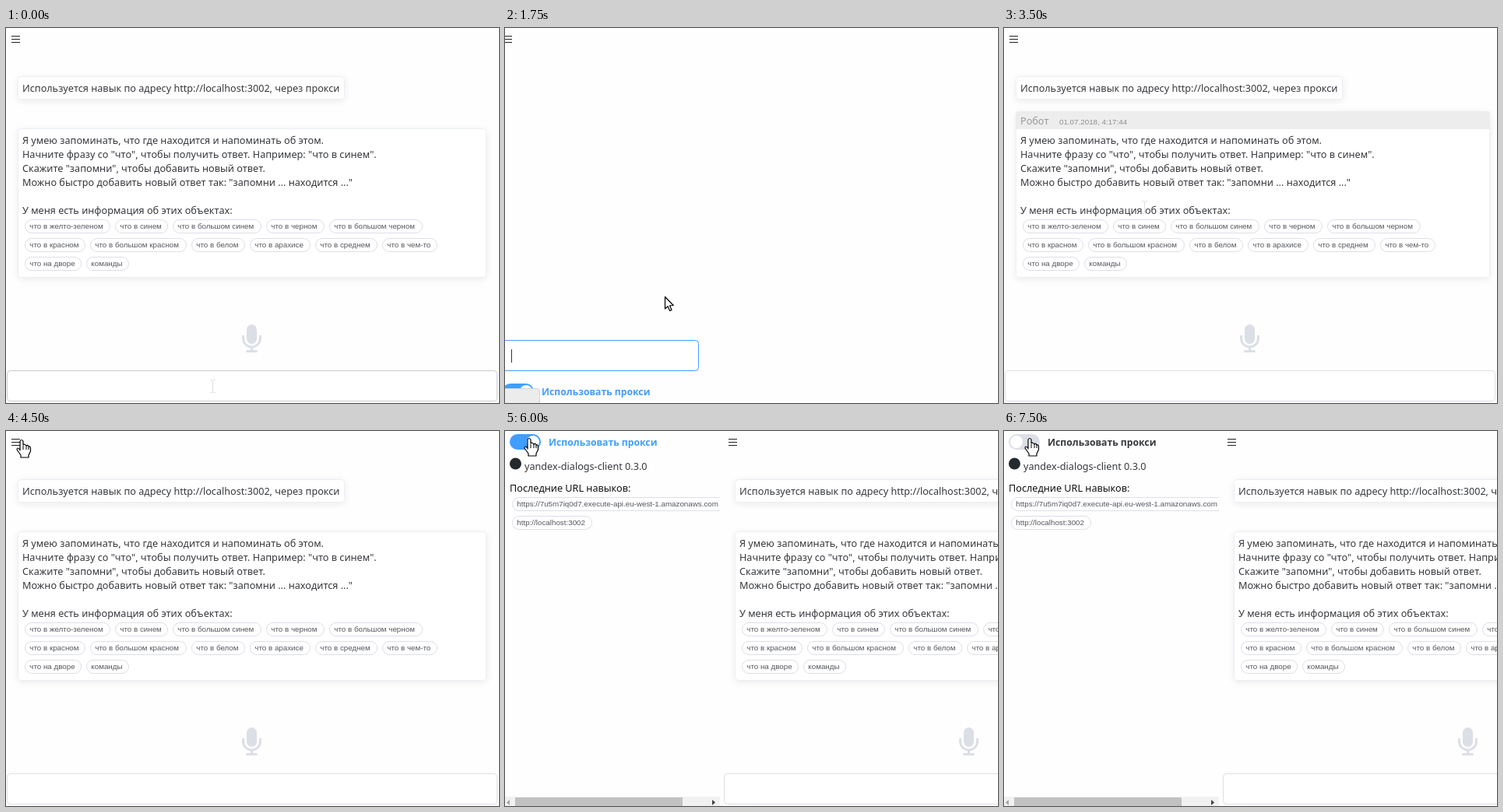
Animation, 633 px wide and 482 px high, one loop 8 s. Source, as an HTML page with a canvas:

```html
<!DOCTYPE html>
<html lang="ru">
<head>
<meta charset="utf-8">
<title>Навык: что где находится</title>
<style>
html, body { margin: 0; width: 633px; height: 482px; overflow: hidden; background: #fff; }
canvas { display: block; }
</style>
</head>
<body>
<canvas id="stage" width="633" height="482"></canvas>
<script>
const ctx = document.getElementById('stage').getContext('2d');
const W = 633, H = 482, LOOP = 8000;
const BODY = '12.65px "Noto Sans", "Open Sans", sans-serif';
const BOLD = '600 12.2px "Noto Sans", "Open Sans", sans-serif';
const SMALL = '9.8px "Liberation Sans", Arial, sans-serif';
const INK = '#36383c', BLUE = '#409eff', PALE = '#dcdfe6';

const INTRO = [
  'Я умею запоминать, что где находится и напоминать об этом.',
  'Начните фразу со "что", чтобы получить ответ. Например: "что в синем".',
  'Скажите "запомни", чтобы добавить новый ответ.',
  'Можно быстро добавить новый ответ так: "запомни ... находится ..."',
  '',
  'У меня есть информация об этих объектах:'
];
// rows of [left, width, label]
const CHIPS = [
  [[24, 110, 'что в желто-зеленом'], [140, 68, 'что в синем'], [214, 114, 'что в большом синем'],
   [334, 75, 'что в черном'], [415, 120, 'что в большом черном']],
  [[24, 78, 'что в красном'], [108, 124, 'что в большом красном'], [238, 69, 'что в белом'],
   [313, 78, 'что в арахисе'], [397, 80, 'что в среднем'], [483, 71, 'что в чем-то']],
  [[24, 73, 'что на дворе'], [103, 55, 'команды']]
];

// each scene holds until the next one starts
const SCENES = [
  { at: 0, cursor: [beam, 265, 460], focus: true },
  { at: 250, cursor: [arrow, 216, 367] },
  { at: 500, cursor: [arrow, 205, 345] },
  { at: 1750, view: loading, cursor: [arrow, 205, 345], status: true },
  { at: 2000, view: drawerOnly, cursor: [arrow, 205, 345], status: true },
  { at: 2250, cursor: [arrow, 205, 345], status: true },
  { at: 2500, cursor: [arrow, 205, 345] },
  { at: 3500, cursor: [beam, 180, 230], hover: 2 },
  { at: 3750, cursor: [beam, 85, 76], hover: 1 },
  { at: 4000, cursor: [arrow, 34, 23] },
  { at: 4250, cursor: [arrow, 24, 24] },
  { at: 4500, cursor: [hand, 20, 11] },
  { at: 4750, cursor: [hand, 20, 11], shift: 147 },
  { at: 5000, cursor: [hand, 20, 11], shift: 280 },
  { at: 6000, cursor: [hand, 31, 9], shift: 280 },
  { at: 6500, cursor: [arrow, 30, 36], shift: 280 },
  { at: 6750, cursor: [arrow, 34, 42], shift: 280 },
  { at: 7000, cursor: [hand, 33, 9], shift: 280 },
  { at: 7250, cursor: [hand, 33, 9], shift: 280, off: true }
];

function text(str, x, y, font = BODY, color = INK) {
  ctx.font = font;
  ctx.fillStyle = color;
  ctx.fillText(str, x, y);
}

function rect(x, y, w, h, color) {
  ctx.fillStyle = color;
  ctx.fillRect(x, y, w, h);
}

function round(x, y, w, h, r, fill, stroke) {
  ctx.beginPath();
  ctx.roundRect(x, y, w, h, r);
  if (fill) { ctx.fillStyle = fill; ctx.fill(); }
  if (stroke) { ctx.strokeStyle = stroke; ctx.lineWidth = 1; ctx.stroke(); }
}

function disc(x, y, r, color) {
  ctx.beginPath();
  ctx.arc(x, y, r, 0, Math.PI * 2);
  ctx.fillStyle = color;
  ctx.fill();
}

function poly(points, fill) {
  ctx.beginPath();
  points.forEach(p => ctx.lineTo(p[0], p[1]));
  ctx.closePath();
  ctx.fillStyle = fill;
  ctx.fill();
}

function card(x, y, w, h) {
  ctx.save();
  ctx.shadowColor = 'rgba(0,0,0,.08)';
  ctx.shadowBlur = 10;
  ctx.shadowOffsetY = 2;
  round(x, y, w, h, 4, '#fff');
  ctx.restore();
  round(x + .5, y + .5, w - 1, h - 1, 4, null, '#ebeef5');
}

function chip(x, y, w, label) {
  round(x + .5, y - 8.5, w - 1, 17, 8.5, '#fff', PALE);
  text(label, x + 6.3, y + 3, SMALL, '#55575c');
}

function header(x, y, w) {
  round(x, y, w, 23, [4, 4, 0, 0], '#ededed');
  text('Робот', 21, y + 17, BODY, '#999');
  text('01.07.2018, 4:17:44', 71, y + 17, SMALL, '#8c8e93');
}

function menu(x) {
  for (const y of [10, 14, 18]) rect(x, y, 11, 1, '#222');
}

function mic() {
  round(309, 381, 13, 25, 6.5, PALE);
  ctx.strokeStyle = PALE;
  ctx.lineWidth = 3;
  ctx.beginPath();
  ctx.moveTo(304.5, 395);
  ctx.lineTo(304.5, 399);
  ctx.arc(315.5, 399, 11, Math.PI, 0, true);
  ctx.lineTo(326.5, 395);
  ctx.stroke();
  rect(314, 410, 3, 5, PALE);
  round(308, 414, 15, 3, 1.5, PALE);
}

function chat(s) {
  menu(7);
  const first = s.hover === 1, second = s.hover === 2;
  card(15, first ? 40 : 62, first ? 427 : 420, first ? 52 : 30);
  if (first) header(15, 40, 427);
  text('Используется навык по адресу http://localhost:3002, через прокси', 21, 82);
  card(15, second ? 107 : 129, second ? 609 : 602, second ? 214 : 192);
  if (second) header(15, 107, 609);
  INTRO.forEach((line, i) => text(line, 21, 149 + i * 18));
  CHIPS.forEach((row, i) => row.forEach(([x, w, label]) => chip(x, 255 + i * 24, w, label)));
  mic();
  round(1.5, 440.5, 629, 39, 4, '#fff', s.focus ? '#c8cacf' : PALE);
}

function toggle(x, y, on) {
  round(x, y, 40, 20, 10, on ? BLUE : PALE);
  disc(x + (on ? 30 : 10), y + 10, 8, '#fff');
  text('Использовать прокси', x + 50, y + 15, BOLD, on ? BLUE : INK);
}

function scrollbar() {
  rect(0, 470, 276, 12, '#f1f1f1');
  rect(13, 471, 215, 11, '#c1c1c1');
  poly([[2, 477.5], [6, 474], [6, 481]], '#a3a3a3');
  poly([[270, 477.5], [266, 474], [266, 481]], '#404040');
}

function drawer(width, on, bar) {
  ctx.save();
  ctx.beginPath();
  ctx.rect(0, 0, width, H);
  ctx.clip();
  toggle(6, 4, on);
  disc(13.5, 42, 7.5, '#24292e');
  text('yandex-dialogs-client 0.3.0', 25, 50);
  text('Последние URL навыков:', 6, 78, BODY, '#111');
  chip(9, 94, 330, 'https://7u5m7iq0d7.execute-api.eu-west-1.amazonaws.com');
  chip(9, 118, 103, 'http://localhost:3002');
  if (bar) scrollbar();
  ctx.restore();
}

function loading() {
  menu(-2);
  round(-10.5, 401.5, 259, 39, 4, '#fff', BLUE);
  rect(8, 413, 1, 17, '#333');
  toggle(-3, 457, true);
}

function drawerOnly() {
  ctx.save();
  ctx.translate(-4, 0);
  drawer(276, true, false);
  ctx.restore();
}

function panes(s) {
  const shift = s.shift || 0;
  if (shift) drawer(shift - 4, !s.off, true);
  ctx.save();
  ctx.translate(shift, 0);
  chat(s);
  ctx.restore();
}

function outline() {
  ctx.closePath();
  ctx.fillStyle = '#fff';
  ctx.fill();
  ctx.strokeStyle = '#000';
  ctx.lineWidth = 1.2;
  ctx.lineJoin = 'round';
  ctx.stroke();
}

function arrow() {
  ctx.beginPath();
  [[.5, .5], [.5, 16], [4, 12.7], [6.6, 18.5], [9, 17.5], [6.5, 11.8], [11.2, 11.5]]
    .forEach(p => ctx.lineTo(p[0], p[1]));
  outline();
}

// the fingertip is at the origin
function hand() {
  ctx.beginPath();
  ctx.moveTo(-2, 14);
  ctx.lineTo(-2, 2);
  ctx.quadraticCurveTo(0, -1, 2, 2);
  ctx.lineTo(2, 7);
  ctx.quadraticCurveTo(4, 5, 6, 8);
  ctx.quadraticCurveTo(8, 6, 9, 9);
  ctx.quadraticCurveTo(11, 8, 11.5, 11);
  ctx.lineTo(11.5, 15);
  ctx.lineTo(9, 20);
  ctx.lineTo(9, 23);
  ctx.lineTo(-1, 23);
  ctx.lineTo(-1, 20);
  ctx.lineTo(-6, 13);
  ctx.quadraticCurveTo(-6, 9, -2, 13);
  outline();
  for (const x of [2, 6, 9]) rect(x - .5, 8, 1, 5, '#000');
}

function beam() {
  rect(0, -7, 1, 15, '#dedede');
  for (const y of [-8, 8]) {
    rect(-3, y, 3, 1, '#dedede');
    rect(1, y, 3, 1, '#dedede');
  }
}

function draw(now) {
  const t = now % LOOP;
  const s = SCENES.filter(scene => scene.at <= t).pop();
  rect(0, 0, W, H, '#fefefe');
  (s.view || panes)(s);
  if (s.status) round(-2.5, 463.5, 47, 22, 3, '#ececec', '#d4d4d4');
  const [shape, x, y] = s.cursor;
  ctx.save();
  ctx.translate(x, y);
  shape();
  ctx.restore();
}

let start;
function tick(now) {
  start ??= now;
  draw(Math.max(0, now - start));
  requestAnimationFrame(tick);
}
draw(0);
requestAnimationFrame(tick);
</script>
</body>
</html>
```
